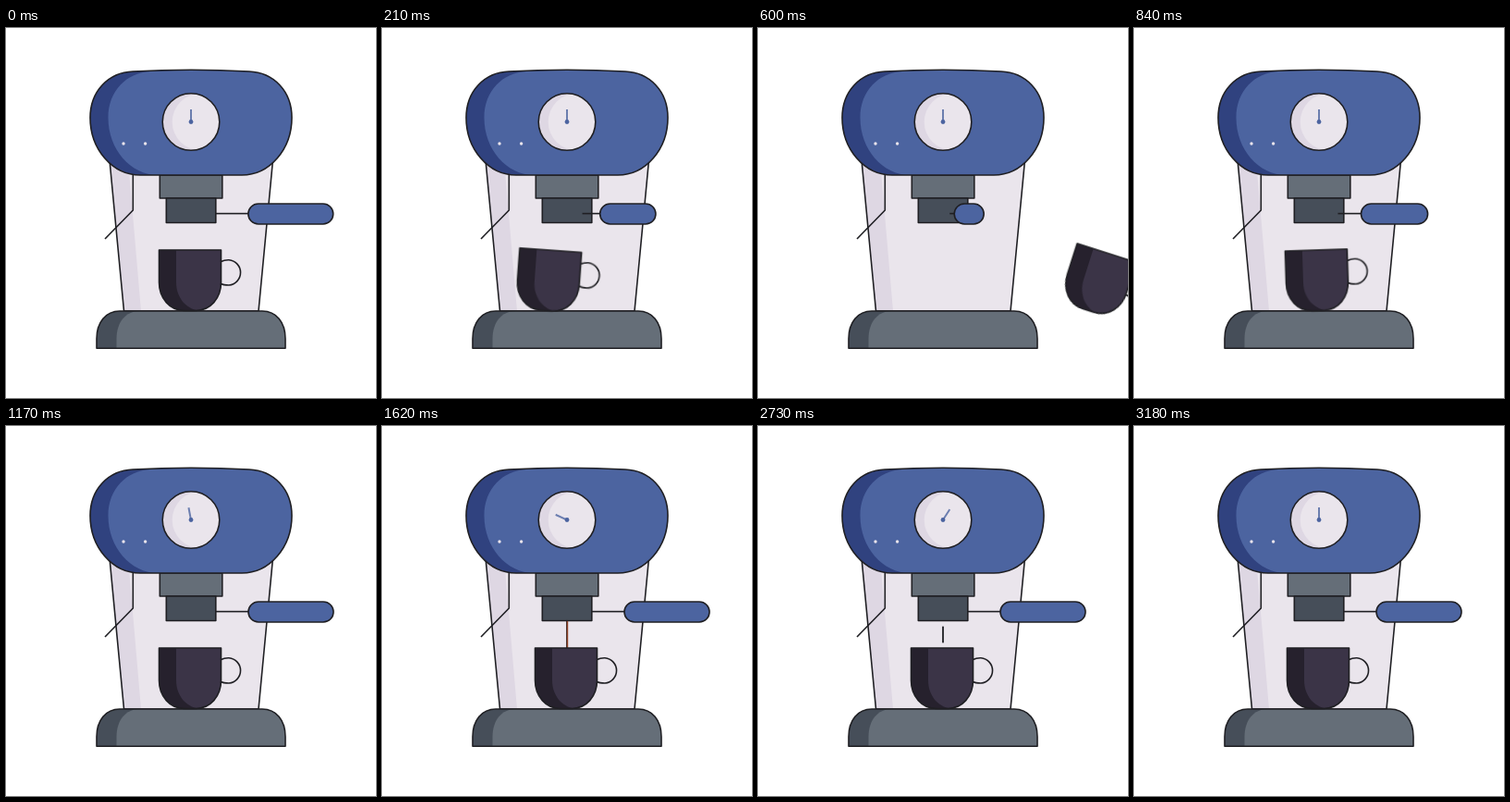
Animation of 400x400 px, one loop 4.02 s. Source, as an HTML page:

```html
<!DOCTYPE html>
<html lang="en">
<head>
<meta charset="utf-8">
<title>Coffee machine</title>
<style>
  html, body { margin: 0; width: 100%; height: 100%; overflow: hidden; background: #fff; }
  svg { display: block; width: 100%; height: 100%; }

  .ink { fill: none; stroke: #1f1f23; stroke-width: 1.6; stroke-linejoin: round; }
  .blue { fill: #4c64a0; }
  .navy { fill: #30427f; }
  .pale { fill: #eae5ec; }
  .lilac { fill: #ded7e3; }
  .steel { fill: #656e78; }
  .iron { fill: #464e59; }
  .plum { fill: #3b3447; }
  .night { fill: #26212d; }

  .slide, .tilt, .arm, .grip, .needle, .drip, .coffee {
    animation: 4020ms linear infinite;
  }
  .slide { animation-name: slide; }
  .tilt { animation-name: tilt; transform-origin: 199px 306px; }
  .arm { animation-name: arm; fill: #1f1f23; }
  .grip { animation-name: grip; }
  .needle { animation-name: needle; transform-origin: 200px 101.5px; }
  .drip { animation-name: drip; fill: #1f1f23; }
  .coffee { animation-name: drip, pour; animation-duration: 4020ms; fill: #8f4328; }

  /* The cup leaves on the left and comes back from the right. */
  @keyframes slide {
    0% { transform: translateX(0); animation-timing-function: cubic-bezier(.333, 0, .667, 0); }
    12.19% { transform: translateX(-268px); animation-timing-function: step-end; }
    12.2% { transform: translateX(287px); animation-timing-function: cubic-bezier(.333, .5, .7, 1); }
    20.9%, 100% { transform: translateX(0); }
  }
  @keyframes tilt {
    0% { transform: rotate(0); animation-timing-function: cubic-bezier(.333, 0, .667, .333); }
    12.2% { transform: rotate(22.4deg); animation-timing-function: cubic-bezier(.37, 0, .63, 1); }
    21.64% { transform: rotate(-2.2deg); animation-timing-function: ease-in-out; }
    25.37%, 100% { transform: rotate(0); }
  }
  /* The lever turns towards the viewer and back. */
  @keyframes arm {
    0%, 14.93% { animation-timing-function: cubic-bezier(.65, 0, .35, 1); }
    0%, 23.88%, 100% { x: 227px; width: 35px; }
    9.95%, 14.93% { x: 207.2px; width: 4.9px; }
  }
  @keyframes grip {
    0%, 14.93% { animation-timing-function: cubic-bezier(.65, 0, .35, 1); }
    0%, 23.88%, 100% { x: 262px; width: 92px; }
    9.95%, 14.93% { x: 212.1px; width: 31.8px; }
  }
  @keyframes needle {
    0%, 26.87%, 42.29%, 60.95% { animation-timing-function: cubic-bezier(.37, 0, .63, 1); }
    0%, 26.87%, 73.38%, 100% { transform: rotate(0); }
    42.29% { transform: rotate(-75deg); }
    60.95% { transform: rotate(75deg); }
  }
  @keyframes drip {
    0%, 29.85% { y: 211px; height: 0; }
    33.58%, 67.16% { y: 211px; height: 29px; }
    69.15%, 100% { y: 225.5px; height: 0; }
  }
  @keyframes pour {
    0%, 67.2% { opacity: 1; }
    67.21%, 100% { opacity: 0; }
  }
</style>
</head>
<body>
<svg viewBox="0 0 400 400">
  <defs>
    <path id="body" d="M112 143 L127.5 306 H273 L288.500 143 Z"/>
    <path id="head" d="M145 159 C115 159 91 131 91 97 C91 68 111 48 137 47 Q200 43.500 263 47 C289 48 309 68 309 97 C309 131 285 159 255 159 Z"/>
    <circle id="dial" cx="200" cy="101.5" r="30.8"/>
    <path id="base" d="M98 346.300 V336 C98 318 108 306 123 306 H277 C292 306 302 318 302 336 V346.300 Z"/>
    <path id="bowl" d="M165.500 240 H232.500 V275 C232.500 292 221 305.500 205 305.500 H193 C177 305.500 165.500 292 165.500 275 Z"/>
    <clipPath id="inBody"><use href="#body"/></clipPath>
    <clipPath id="inHead"><use href="#head"/></clipPath>
    <clipPath id="inDial"><use href="#dial"/></clipPath>
    <clipPath id="inBase"><use href="#base"/></clipPath>
    <clipPath id="inBowl"><use href="#bowl"/></clipPath>
  </defs>

  <use href="#body" class="pale"/>
  <path class="lilac" clip-path="url(#inBody)" d="M100 143 H132 L146 306 H100 Z"/>
  <use href="#body" class="ink"/>
  <path class="ink" d="M137.300 155 V197 L107 228"/>

  <use href="#base" class="iron"/>
  <g clip-path="url(#inBase)"><use href="#base" x="21.500" class="steel"/></g>
  <use href="#base" class="ink"/>

  <rect class="ink steel" style="fill:#656e78" x="166.300" y="159" width="67.500" height="25"/>
  <rect class="ink iron" style="fill:#464e59" x="173.300" y="184" width="53.500" height="26.500"/>

  <use href="#head" class="navy"/>
  <g clip-path="url(#inHead)"><use href="#head" x="19.500" class="blue"/></g>
  <use href="#head" class="ink"/>
  <circle cx="127" cy="125" r="1.700" fill="#eae5ec"/>
  <circle cx="150.600" cy="125" r="1.700" fill="#eae5ec"/>

  <use href="#dial" class="lilac"/>
  <g clip-path="url(#inDial)"><use href="#dial" x="10.500" class="pale"/></g>
  <use href="#dial" class="ink"/>
  <path class="needle" d="M200 101.500 V88" stroke="#4c64a0" stroke-width="1.600"/>
  <circle class="blue" cx="200" cy="101.500" r="2.400"/>

  <rect class="drip" x="199.100" y="211" width="1.800" height="0"/>
  <rect class="coffee" x="199.700" y="211" width="1.500" height="0"/>

  <rect class="arm" x="227" y="199.800" width="35" height="1.600"/>
  <rect class="grip ink" style="fill:#4c64a0" x="262" y="190" width="92" height="22" rx="11"/>

  <g class="slide">
    <g class="tilt">
      <path class="ink" d="M232.500 252.500 C236 250.500 239 250.700 241 250.700 A13.700 13.700 0 0 1 241 278 C238 278 235 278 232.500 276.500"/>
      <use href="#bowl" class="night"/>
      <g clip-path="url(#inBowl)"><use href="#bowl" x="18.500" class="plum"/></g>
      <use href="#bowl" class="ink"/>
    </g>
  </g>
</svg>
</body>
</html>
```
